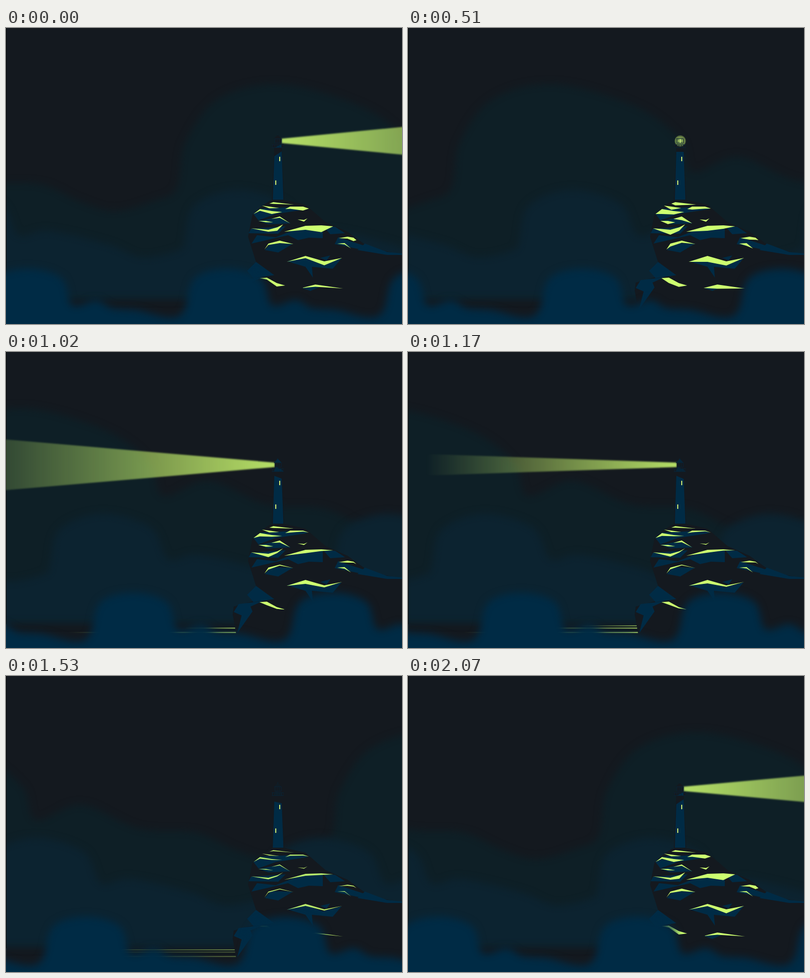
These frames come from a looping animation (800 px wide and 600 px high, 2.1 s). An HTML page:

```html
<!DOCTYPE html>
<html lang="en">
<head>
<meta charset="utf-8">
<title>Lighthouse at night</title>
<style>
html, body { margin: 0; width: 100%; height: 100%; overflow: hidden; background: #14191f; }
svg { display: block; width: 800px; height: 600px; }
.dark { fill: #14191f; }
.blue { fill: #002b45; }
.rail { fill: none; stroke: #0a2233; }
</style>
</head>
<body>
<svg viewBox="0 0 800 600">
  <defs>
    <filter id="soft" filterUnits="userSpaceOnUse" x="0" y="0" width="800" height="660" color-interpolation-filters="sRGB"><feGaussianBlur stdDeviation="8"/></filter>
    <filter id="haze" filterUnits="userSpaceOnUse" x="0" y="0" width="830" height="600" color-interpolation-filters="sRGB"><feGaussianBlur stdDeviation="1.8"/></filter>
    <filter id="edge" filterUnits="userSpaceOnUse" x="0" y="0" width="800" height="600" color-interpolation-filters="sRGB"><feGaussianBlur stdDeviation=".7"/></filter>
    <linearGradient id="ray" gradientUnits="userSpaceOnUse" y1="0" y2="0">
      <stop stop-color="#c8f56e" stop-opacity=".9"/>
      <stop offset="1" stop-color="#c8f56e" stop-opacity="0"/>
    </linearGradient>
    <linearGradient id="shine">
      <stop stop-color="#c8f56e" stop-opacity="0"/>
      <stop offset="1" stop-color="#c8f56e"/>
    </linearGradient>
    <radialGradient id="halo">
      <stop stop-color="#c8f56e" stop-opacity=".75"/>
      <stop offset=".85" stop-color="#a5cc62" stop-opacity=".5"/>
      <stop offset="1" stop-color="#a5cc62" stop-opacity="0"/>
    </radialGradient>
  </defs>
  <rect class="dark" width="800" height="600"/>
  <g filter="url(#soft)"><path id="far" fill="#0e1f26"/></g>
  <g filter="url(#soft)"><path id="mid" fill="#0c2330"/></g>
  <rect width="1" height="552" fill="#030506"/>
  <g id="water" fill="url(#shine)"></g>
  <path id="beam" fill="url(#ray)" filter="url(#haze)"/>

  <!-- tower -->
  <path class="dark" d="M541 225L549 216 557 225 556 235H561V243H557L562 350H537L542 243H537V235H543V225Z"/>
  <path id="tower" class="blue"/>
  <path id="sideLit" class="blue" d="M544 242L557 235V243Z"/>
  <path id="dome" class="blue" d="M541 225L549 216 557 225ZM545 233L557 238 561 243H540Z"/>
  <circle id="glow" cx="550" cy="229" r="12" fill="url(#halo)"/>
  <ellipse id="lamp" cy="228.5" fill="#d2f57a"/>
  <path class="rail" d="M549 215V218M542 224.500H556M543 233.500H556M537 236.500H561M537 242.500H561"/>
  <path class="rail" stroke-width="9" stroke-dasharray="1 3.200" d="M543 229H557"/>
  <path class="rail" stroke-width="6" stroke-dasharray="1 3.500" d="M538 239.500H561"/>
  <path fill="#d8f070" d="M552 261h2v9h-2zM544 309h2v9h-2z"/>

  <!-- cliff -->
  <path class="dark" d="M533 350L565 349 605 358 645 393 690 413 735 446 800 459V600H470L458 532 460 516 500 505 488 491 505 474 489 423 498 378 513 364Z"/>
  <path class="blue" d="M500 377L514 366 600 362 610 367 545 377 510 390Z"/>
  <path class="blue" d="M510 391L552 383 575 396 530 398Z"/>
  <path class="blue" d="M495 407L565 402 550 417 490 416Z"/>
  <path class="blue" d="M496 437L507 420 545 424 600 402 640 400V426L612 425 590 430 570 420Z"/>
  <path class="blue" d="M523 450L535 436 580 437 550 455Z"/>
  <path class="blue" d="M640 401L665 403 685 416 655 418Z"/>
  <path class="blue" d="M664 438L671 424 735 445 712 448Z"/>
  <path class="blue" d="M710 450L725 437 770 454 800 457V460H770Z"/>
  <path class="blue" d="M568 473L604 463 640 477 678 467 660 488 618 484 620 506 605 484Z"/>
  <path class="blue" d="M635 466L655 461 648 471Z"/>
  <path class="blue" d="M487 492L505 474 542 501 500 507Z"/>
  <path class="blue" d="M460 527L470 511 518 505 494 516 498 526 467 570 476 534Z"/>
  <path class="blue" d="M598 527L640 522 615 533Z"/>
  <path id="glints" fill="#cdff70" filter="url(#edge)"/>

  <g filter="url(#soft)"><path id="near" class="blue"/></g>
</svg>
<script>
const $ = id => document.getElementById(id);
const LOOP = 2100, STEP = 30;

function set(el, attrs) {
  for (const name in attrs) el.setAttribute(name, attrs[name]);
}

// Piecewise linear track: time, value, time, value, ...
function track(t, ...k) {
  if (t <= k[0]) return k[1];
  for (let i = 2; i < k.length; i += 2)
    if (t <= k[i]) return k[i - 1] + (k[i + 1] - k[i - 1]) * (t - k[i - 2]) / (k[i] - k[i - 2]);
  return k[k.length - 1];
}

// A cloud bank repeats one smooth outline and drifts left at a steady speed (px per ms)
const clouds = [];
function cloud(id, speed, width, base, outline) {
  const n = outline.length / 2;
  const at = i => {
    const k = Math.floor(i / n), j = 2 * (i - k * n);
    return [outline[j] + k * width, outline[j + 1]];
  };
  let d = `M${at(-n)[0]} ${base}L${at(-n)}`;
  for (let i = -n; i < 4 * n; i++) {
    const [a, b, c, e] = [at(i - 1), at(i), at(i + 1), at(i + 2)];
    const lead = [0, 1].map(m => b[m] + (c[m] - a[m]) / 6);
    const tail = [0, 1].map(m => c[m] - (e[m] - b[m]) / 6);
    d += `C${lead} ${tail} ${c}`;
  }
  set($(id), { d: d + `V${base}Z` });
  clouds.push(t => set($(id), { transform: `translate(${-speed * t})` }));
}
cloud('far', .505, 1085, 548, [345,325, 362,232, 430,143, 555,114, 715,158, 805,224, 833,292,
  925,261, 1040,309, 1154,317, 1235,352, 1305,371, 1385,350]);
cloud('mid', .267, 575, 548, [361,430, 380,360, 466,328, 565,356, 600,420,
  660,411, 780,438, 850,465, 925,450]);
cloud('near', .1865, 403, 650, [-43,572, -22,507, 45,488, 112,507, 134,562,
  182,552, 215,568, 265,572, 330,587]);

// A glint is a ridge line that thickens downwards: early along the ridge
// when lit from the front, late along it when lit from the right
const glints = [];
function glint(front, right, ...ridge) {
  const last = ridge.length - 2;
  glints.push((f, r, left) => {
    let top = 'M', low = '';
    for (let i = 0; i <= last; i += 2) {
      const u = i / last;
      const w = front * f * Math.sin(Math.PI * u ** .7) * (1 - left * u)
        + right * r * Math.sin(Math.PI * u ** 1.5);
      top += `${ridge[i]} ${ridge[i + 1]} `;
      low = `L${ridge[i]} ${ridge[i + 1] + w}` + low;
    }
    return top + low + 'Z';
  });
}
glint(7, 4, 532,356, 540,353, 582,358);
glint(7, 4, 517,360, 532,362, 552,365);
glint(6, 8, 564,367, 574,362, 600,362, 612,366);
glint(10, 6, 500,377, 513,367, 537,371, 558,373);
glint(7, 3, 510,391, 525,391, 540,394);
glint(8, 3, 536,387, 553,382, 574,396);
glint(4, 4, 589,388, 602,389, 609,386);
glint(10, 7, 495,406, 530,409, 548,404, 560,398);
glint(10, 14, 562,413, 605,401, 637,400, 661,402);
glint(6, 5, 522,449, 530,437, 553,431, 581,438);
glint(6, 7, 672,426, 690,423, 702,425, 708,430);
glint(6, 3, 669,437, 684,436, 697,447);
glint(12, 8, 567,474, 605,462, 643,473, 679,466);
glint(11, 7, 512,507, 527,506, 547,517, 564,522);
glint(9, 5, 597,527, 625,520, 681,528);

function drawGlints(t) {
  const front = track(t, 0,0, 510,1, 870,.9, 1320,.75, 1740,.05, 2070,0);
  const right = track(t, 0,1, 510,0, 1320,0, 1740,.35, 2070,1);
  const left = track(t, 510,0, 1320,1, 1740,1);
  set($('glints'), {
    d: glints.map(g => g(front, right, left)).join(''),
    opacity: track(t, 1320,1, 1740,.8, 2070,1)
  });
}

// Reflections on the water grow out from the cliff, then fade
const streaks = [];
function streak(y, height, length, opacity) {
  const el = document.createElementNS('http://www.w3.org/2000/svg', 'rect');
  set(el, { y, height });
  $('water').append(el);
  streaks.push(t => {
    const width = length(t);
    set(el, { x: 466 - width, width, opacity: opacity(t) });
  });
}
streak(567.5, 2, t => track(t, 780,0, 870,96, 1020,340, 1320,366), t => track(t, 1320,1, 1650,0));
streak(558.8, 1.7, t => track(t, 900,0, 1020,105, 1320,355), t => track(t, 1320,.9, 1650,0));
streak(554.3, 1.3, t => track(t, 1100,0, 1320,365), t => track(t, 1320,.85, 1740,.45, 1830,0));

function drawBeam(t) {
  const isLeft = t > 525 && t < 1575;
  const off = isLeft ? Math.abs(t - 1060) : Math.min(t, LOOP - t);
  const x = isLeft ? 543 : 557, y = 228.7, r = 4.5;
  const length = 810 * Math.max(0, 1 - off / 375) ** 1.35;
  const slope = off < 185 ? .097 * Math.cos(Math.PI / 2 * off / 185) ** 2 : 0;
  const end = isLeft ? x - length : x + length, far = r + slope * length;
  set($('ray'), { x1: x, x2: end });
  set($('beam'), {
    d: `M${x} ${y - r}L${end} ${y - far}V${y + far}L${x} ${y + r}Z`,
    opacity: Math.max(0, Math.min(1, (length - 12) / 60))
  });
}

function drawTower(t) {
  const left = track(t, 0,260, 510,251, 1320,251, 1740,258, 2070,260);
  const right = track(t, 0,250, 510,251, 870,256, 1320,258, 1740,258, 2070,250);
  set($('tower'), { d: `M542 ${left}L557 ${right} 560.5 348H539Z` });
  set($('sideLit'), { opacity: track(t, 0,1, 350,0, 1740,0, 2070,1) });
  set($('dome'), { opacity: track(t, 600,0, 870,.7, 1020,.9, 1320,.5, 1650,0) });
  set($('glow'), { opacity: track(t, 250,0, 480,1, 570,1, 800,0) });
  set($('lamp'), {
    cx: track(t, 250,555, 510,550, 870,545),
    rx: track(t, 250,1, 510,4, 870,2),
    ry: track(t, 510,4.5, 870,3.5),
    opacity: track(t, 250,0, 420,1, 890,1, 960,0)
  });
}

const start = performance.now();
function tick() {
  const elapsed = (performance.now() - start) % LOOP;
  const t = Math.floor(elapsed / STEP) * STEP;
  for (const draw of [...clouds, ...streaks, drawBeam, drawTower, drawGlints]) draw(t);
  requestAnimationFrame(tick);
}
tick();
</script>
</body>
</html>
```
